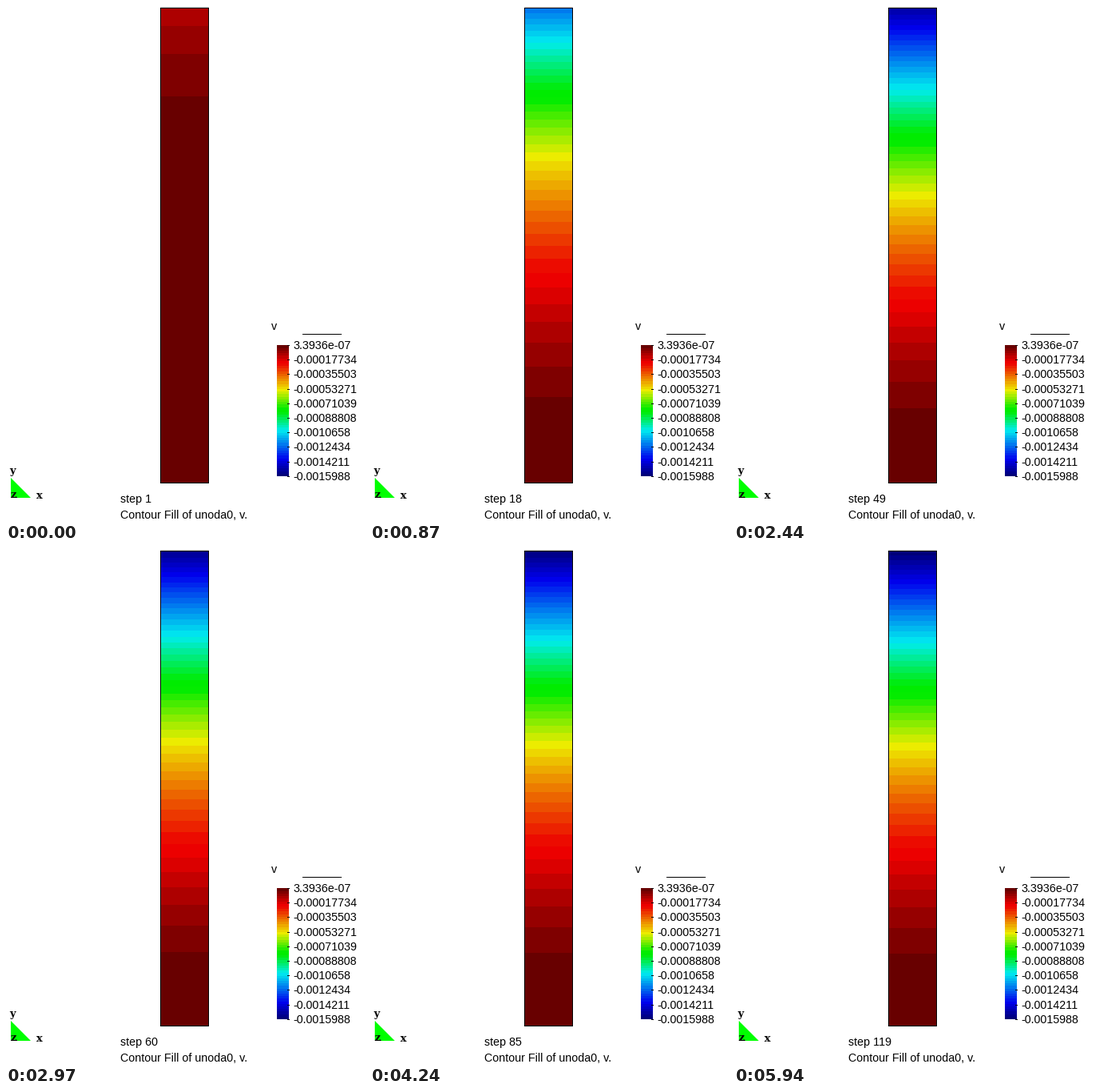
Write a matplotlib script that moves like this. It is 448x644 px and loops after 5.97 s.

```python
import numpy as np
import matplotlib.pyplot as plt
from matplotlib.animation import FuncAnimation
from matplotlib.patches import Polygon, Rectangle

W, H, DPI = 448, 644, 100
PX = 72 / DPI                      # one pixel in points
LOOP, TICK = 5970, 15              # ms
V_MAX, V_MIN = 3.3936e-07, -0.00159881
LEFT, RIGHT, TOP, BOTTOM = 193, 254, 2, 597   # column with its outline

fig = plt.figure(figsize=(W / DPI, H / DPI), dpi=DPI, facecolor="white")
ax = fig.add_axes([0, 0, 1, 1])


def label(x, y, s, size=14.25, font="Liberation Sans", **kw):
    return ax.text(x, y, s, fontsize=size * PX, family=font, va="baseline", **kw)


def line(x0, x1, row):
    ax.plot([x0, x1], [row + 0.5] * 2, color="black", lw=PX,
            solid_capstyle="butt", snap=False)


def palette(u):
    """Banded rainbow: dark red at 0, dark blue at 1."""
    band = np.maximum(np.floor((256 * u - 1) / 5), 0)
    u = (5 * band + 3.5) / 256
    r = np.interp(u, [0.0137, 0.125, 0.345, 0.485], [104, 236, 238, 0])
    g = np.interp(u, [0.14, 0.345, 0.5, 0.65, 0.87], [0, 236, 236, 236, 0])
    b = np.interp(u, [0.51, 0.65, 0.87, 1], [0, 240, 238, 112])
    return np.stack([r, g, b], axis=-1)[:, None] / 255


def strip(u, x0, x1, y0, y1):
    return ax.imshow(palette(u), extent=(x0, x1, y1, y0), aspect="auto",
                     interpolation="nearest")


# Diffusion with a fixed flux at the top and zero pressure at the base
rows = np.arange(TOP, BOTTOM) + 0.5
height = (BOTTOM - rows) / (BOTTOM - TOP)
n = np.arange(8)
lam = (2 * n + 1) * np.pi / 2
modes = 4 * (-1.0) ** n / lam ** 3 * (1 - np.cos(np.outer(height, lam)))


def settlement(step):
    t = 1.05 * np.log(1 + (step - 0.1) / 24)
    return np.clip((height ** 2 - modes @ np.exp(-lam ** 2 * t)) / 0.99, 0, 1)


column = strip(settlement(1), LEFT, RIGHT, TOP, BOTTOM)
ax.add_patch(Rectangle((LEFT + 0.5, TOP + 0.5), RIGHT - LEFT - 1,
                       BOTTOM - TOP - 1, fill=False, ec="black", lw=PX,
                       snap=False, zorder=3))

# Legend
strip((np.arange(164) + 0.5) / 164, 339, 354, 424, 588)
label(332, 405, "v")
line(371, 420, 410)
for i, v in enumerate(np.linspace(V_MAX, V_MIN, 10)):
    y = 424 + 18.2 * i
    label(359.5, y + 5, f"{v:.5g}")
    line(352, 355, round(y))

# Axis triad
ax.add_patch(Polygon([(6, 590), (6, 615), (31, 615)], fc="#00ff00", ec="none"))
for x, y, s in [(4.5, 585, "y"), (37.5, 616, "x"), (5.5, 615, "z")]:
    label(x, y, s, 13, "DejaVu Serif", weight="bold")
line(6, 14, 614)

counter = label(143, 621, "step 1")
label(143, 641, "Contour Fill of unoda0, v.")

ax.set_xlim(0, W)
ax.set_ylim(H, 0)
ax.axis("off")


def update(k):
    shot = 3 * (k * TICK + 5) // 100       # 30 shots a second
    step = 1 + 2 * shot // 3               # 20 steps a second
    column.set_data(palette(settlement(step)))
    counter.set_text(f"step {step}")
    return column, counter


anim = FuncAnimation(fig, update, frames=LOOP // TICK, interval=TICK,
                     repeat=True, repeat_delay=0)
plt.show()
```
